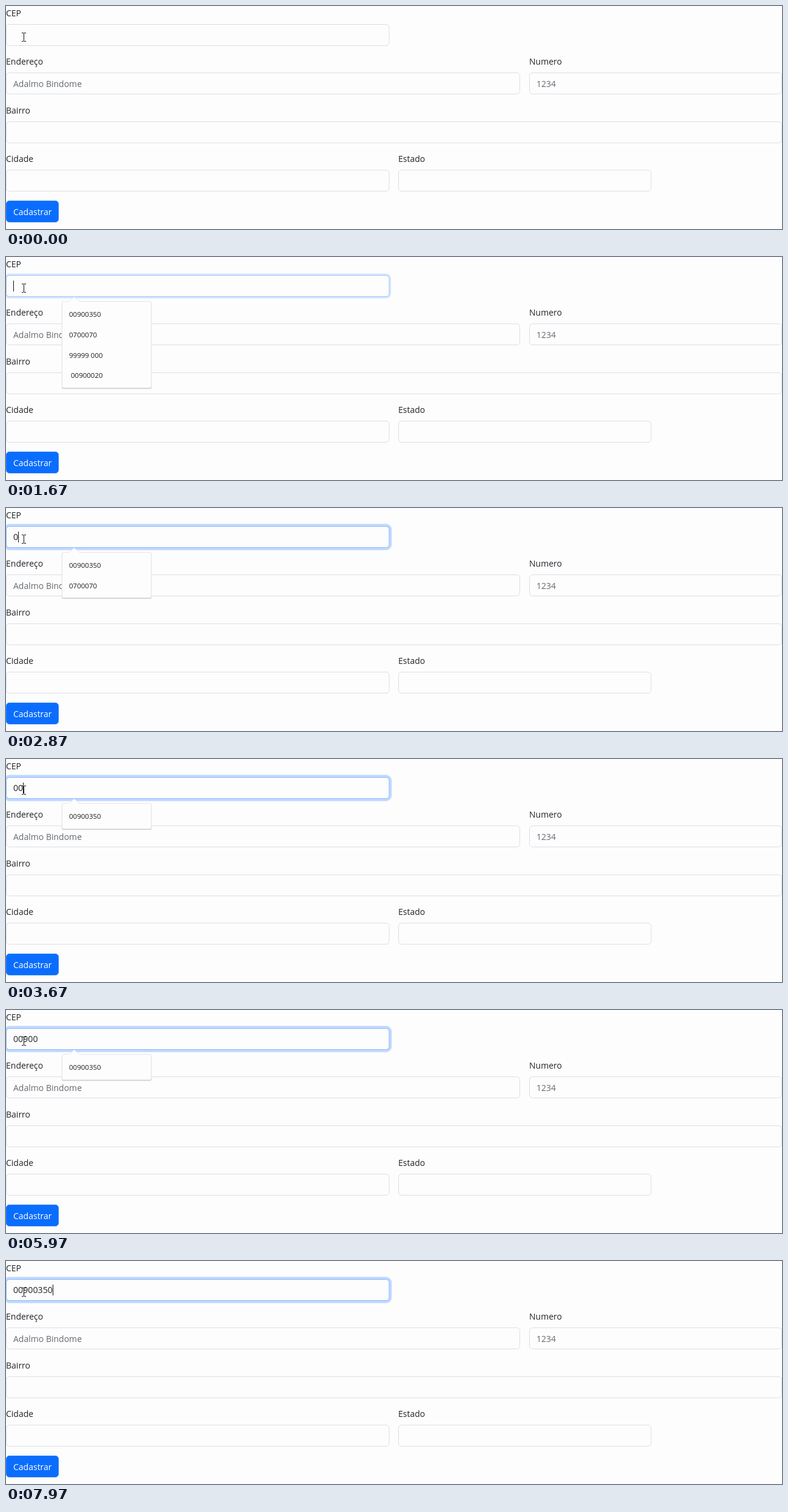
Recreate the animation shown at these times as an HTML page. Size 1280 px wide and 369 px high, loop 8000 ms.

```html
<!DOCTYPE html>
<html lang="pt-BR">
<head>
<meta charset="utf-8">
<title>Cadastro</title>
<style>
  html, body { margin: 0; width: 100%; height: 100%; overflow: hidden; background: #fdfdfd; }
  svg { display: block; width: 1280px; height: 369px; }
  text { font: 14px "Open Sans", "Noto Sans", sans-serif; fill: #212529; white-space: pre; }
  .hint { fill: #646a70; }
  .digits { font-size: 14.2px; }
  .option { font-size: 11.5px; fill: #1c1c1c; }
  .field { fill: #fdfdfd; stroke: #dcdee6; }
</style>
</head>
<body>
<svg id="stage" viewBox="0 0 1280 369"></svg>
<script>
const LOOP = 8000;
const FOCUS = 1580;
const FADE = 150;
const BLINK = 530;
const CODE = "00900350";
const KEY_TIMES = [2700, 3300, 3700, 4200, 5200, 6350, 6850, 7480];
const OPTIONS = [CODE, "0700070", "99999 000", " 00900020"];
const ROW = 33.7;

const stage = document.getElementById("stage");

function add(tag, attrs, parent = stage) {
  const el = document.createElementNS("http://www.w3.org/2000/svg", tag);
  for (const key in attrs) el.setAttribute(key, attrs[key]);
  return parent.appendChild(el);
}

function write(x, y, str, cls = "", parent = stage) {
  const el = add("text", { x, y, class: cls }, parent);
  el.textContent = str;
  return el;
}

function field(x, y, width, label, hint = "") {
  write(x, y - 13, label);
  const box = add("rect", {
    x: x + .5, y: y + .5, width: width - 1, height: 35, rx: 5, class: "field"
  });
  if (hint) write(x + 12, y + 24, hint, "hint");
  return box;
}

const show = (el, on) => el.setAttribute("visibility", on ? "visible" : "hidden");

// Form
const ring = add("rect", { fill: "#0d6efd" });
const codeBox = field(0, 30, 632.5, "CEP");
field(0, 110, 848, "Endereço", "Adalmo Bindome");
field(863, 110, 417, "Numero", "1234");
field(0, 191, 1280, "Bairro");
field(0, 271, 632.5, "Cidade");
field(647, 271, 417.5, "Estado");
add("rect", {
  x: .5, y: 322.5, width: 86, height: 35, rx: 5, fill: "#0a6dfd", stroke: "#2c80fd"
});
write(12, 345.5, "Cadastrar").style.fill = "#fff";

const typed = write(12, 53, "", "digits");
const caret = add("rect", { y: 39, width: 1, height: 18, fill: "#111" });

// Suggestion list
const popup = add("g", {});
const shades = [
  { x: 91.5, dy: 2, width: 149, fill: "#0000000c" },
  { x: 92, dy: 1, width: 148, fill: "#00000024" }
].map(({ x, dy, width, fill }) => ({
  el: add("rect", { x, y: 74, width, rx: 3, fill }, popup), dy
}));
const panel = add("rect", {
  x: 92.5, y: 73.5, width: 147, rx: 2.5, fill: "#fdfdfd", stroke: "#e6e6ec"
}, popup);
add("path", { d: "M103 74.5L112.5 66L122 74.5Z", fill: "#fdfdfd" }, popup);
add("path", { d: "M103.5 73.5L112.5 66L121.5 73.5", fill: "none", stroke: "#e6e6ec" }, popup);
const options = OPTIONS.map((str, i) => write(104, 99.3 + i * ROW, str, "option", popup));

// Text pointer
add("path", {
  d: "M26 44.5H29M30 44.5H33M29.5 45V58M26 58.5H29M30 58.5H33",
  fill: "none", stroke: "#111"
});

function draw(t) {
  const focused = t >= FOCUS;
  const p = Math.min(1, Math.max(0, (t - FOCUS) / FADE));
  const ease = p * p * (3 - 2 * p);
  const spread = 3.75 * ease;

  const frame = {
    x: -spread, y: 30 - spread, width: 632.5 + 2 * spread, height: 36 + 2 * spread,
    rx: 5.5 + spread, "fill-opacity": .25 * ease
  };
  for (const key in frame) ring.setAttribute(key, frame[key]);
  const mix = (a, b) => Math.round(a + (b - a) * ease);
  codeBox.style.stroke = `rgb(${mix(220, 134)},${mix(222, 183)},${mix(230, 254)})`;

  const count = KEY_TIMES.filter(k => t >= k).length;
  typed.textContent = CODE.slice(0, count);

  const lastInput = count ? KEY_TIMES[count - 1] : FOCUS;
  caret.setAttribute("x", Math.round(12 + count * 8.12));
  show(caret, focused && Math.floor((t - lastInput) / BLINK) % 2 === 0);

  const rows = count === 0 ? 4 : count === 1 ? 2 : 1;
  const open = focused && count < CODE.length;
  const height = Math.round(8 + rows * ROW);
  show(popup, open);
  panel.setAttribute("height", height);
  shades.forEach(({ el, dy }) => el.setAttribute("height", height + dy));
  options.forEach((el, i) => show(el, open && i < rows));
}

const start = performance.now();
function tick() {
  draw((performance.now() - start) % LOOP);
  requestAnimationFrame(tick);
}
tick();
</script>
</body>
</html>
```
